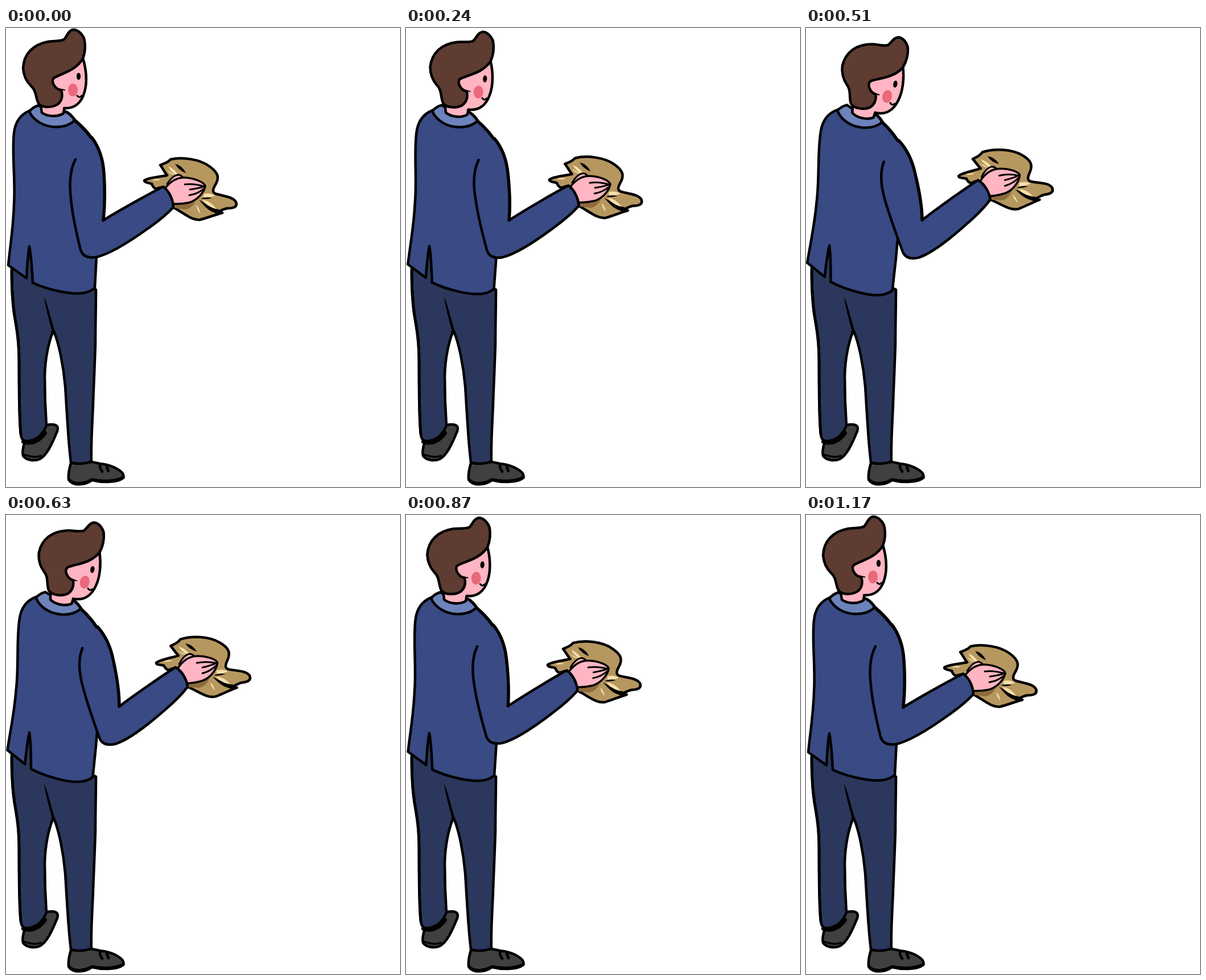
An HTML page that plays this animation: 692 by 807 pixels, repeating every 1290 ms.

```html
<!DOCTYPE html>
<html lang="en">
<head>
<meta charset="utf-8">
<title>Polishing loop</title>
<style>
  html, body { margin: 0; width: 100%; height: 100%; overflow: hidden; background: #fff; }
  svg { display: block; width: 692px; height: 807px; }
  .line { fill: none; }
  .ink { fill: #000; stroke: none; }
  .flat { stroke: none; }
  .jacket { fill: #394a84; }
  .trousers { fill: #2b375c; }
  .collar { fill: #6c83bb; }
  .shoe { fill: #404040; }
  .skin { fill: #ffb5c2; }
  .hair { fill: #5e3c31; }
  .cloth { fill: #b6975f; }
  .shade { fill: #8c6a3b; }
  .shine { fill: #f6dfaa; }
</style>
</head>
<body>
<svg viewBox="0 0 692 807" stroke="#000" stroke-width="4.500" stroke-linecap="round" stroke-linejoin="round">
  <g id="legs">
    <path class="shoe" d="M33 727C30 737 28 746 30 752C35 760 50 762 59 758C74 750 83 725 90 709C93 699 88 695 71 698Z"/>
    <path class="line" stroke-width="3.500" d="M31 750C42 753 52 756 61 752"/>
    <path class="shoe" d="M114 765C111 775 109 785 110 794C117 806 139 804 151 795C171 800 196 799 206 791C210 780 187 768 165 766Q157 764 150 763Z"/>
    <path class="line" stroke-width="5" d="M111 794C118 803 137 802 151 794C170 798 192 797 206 790"/>
    <path class="line" d="M165 769Q165 775 169 780M177 768Q177 774 180 779"/>
    <path class="trousers" d="M40 400L10 420C10 450 11 480 15 506C20 534 23 554 23 590C23 635 23 685 26 714C27 725 32 727 40 726C53 724 64 716 71 699C69 670 68 643 68 612C69 577 75 554 83 531C93 553 101 595 104 630C107 675 109 725 114 764Q132 769 150 762C149 725 152 690 153 660C154 630 156 590 157 555C157 520 158 490 158 460L148 455L60 395Z"/>
    <path class="line" stroke-width="5" d="M10 426C10 450 11 480 15 506C20 534 23 554 23 590C23 635 23 685 26 714"/>
    <path class="line" stroke-width="8" d="M31 727C45 732 59 725 68 712"/>
    <path class="ink" d="M67 473C74 488 78 508 84 527L83 542C78 520 70 497 67 473Z"/>
  </g>

  <g id="torso">
    <path class="jacket" d="M42 145C25 152 16 165 14 185C10 220 17 270 14 310C13 350 7 385 4 417L36 440C37 420 38 400 41 384C45 405 46 430 47 448C75 461 115 469 135 466C145 465 151 461 156 457L159 400L161 330L164 250L158 206C148 188 132 172 120 162Z"/>
    <path class="line" stroke-width="5.500" d="M118 160C133 172 149 189 158 206"/>
    <path class="collar" d="M57 136Q47 139 41 147C49 164 68 174 88 174C104 174 115 168 121 162C115 153 109 148 102 146L78 148Z"/>
    <path class="line" stroke-width="5" d="M107 148Q115 153 121 162"/>
  </g>

  <g id="hold">
    <path class="cloth" d="M243 268C249 263 269 262 283 259C278 253 275 246 271 241C278 238 284 237 289 231C310 226 341 231 357 243C374 255 375 264 367 277C362 286 363 290 370 292C384 296 399 297 404 306C407 315 399 317 389 317C382 318 376 322 369 324L380 325C362 330 353 334 341 337C326 339 312 325 295 316L281 282Q274 279 269 281C262 285 258 280 256 274C250 272 243 272 243 268Z"/>
    <path class="flat shade" d="M291 304C304 311 323 310 334 303Q327 317 315 319L294 316Z"/>
    <path class="flat shade" d="M344 276Q352 281 346 291L337 301Q346 283 344 276Z"/>
    <path class="flat shine" d="M285 243Q298 249 304 261Q291 256 285 243ZM283 250Q292 256 299 259Q288 258 283 250ZM256 267Q264 264 272 267Q263 269 256 267ZM347 292Q358 289 367 295Q357 299 347 298ZM345 302Q360 304 370 319Q354 315 345 302ZM334 311Q340 317 341 326Q335 320 334 311Z"/>
    <path class="ink" d="M297 239Q309 241 316 255Q304 251 297 239ZM339 302C350 307 357 317 374 319L371 326C355 323 347 311 339 302ZM342 300Q350 296 362 299Q353 302 342 300Z"/>
    <path class="skin" stroke-width="3" d="M283 274C288 266 295 259 302 258Q307 258 311 263L291 276Z"/>
    <path class="skin" stroke-width="3.500" d="M280 281C288 271 300 262 315 263C331 264 348 271 350 278C348 289 336 303 321 307Q306 310 293 309Z"/>
    <path class="line" stroke-width="3" d="M314 275Q331 273 349 279M323 284Q337 282 347 279M322 294Q336 292 347 283"/>
  </g>

  <g id="sleeve">
    <path class="jacket flat" d="M122 231C112 250 111 275 114 300C117 335 125 365 131 390C134 400 143 405 158 403C185 397 225 370 250 352C270 338 285 325 294 315C293 300 286 286 276 279C258 288 205 317 171 338C174 310 174 285 172 255C170 225 160 205 151 193Z"/>
    <path class="line" d="M122 231C112 250 111 275 114 300C117 335 125 365 131 390C134 400 143 405 158 403C185 397 225 370 250 352C270 338 285 325 294 315C293 300 286 286 276 279C258 288 205 317 171 338"/>
    <path class="line" stroke-width="5.500" d="M151 193C160 205 170 225 172 255C174 285 174 310 171 338"/>
  </g>

  <g id="head">
    <path class="skin flat" d="M75 60L135 53C141 72 143 95 138 112C133 131 121 141 102 142L101 150C90 157 73 156 63 149L58 128Z"/>
    <path class="line" d="M135 53C141 72 143 95 138 112C133 131 121 142 102 141"/>
    <path class="line" d="M102 143L101 150C90 157 73 156 63 149L61 136"/>
    <path class="hair" d="M117 3C109 5 107 15 102 20C95 24 84 22 74 24C48 29 31 45 30 71C31 84 36 94 44 102C54 110 52 126 58 134C66 141 82 140 91 134C98 128 100 119 97 109C86 108 78 94 84 88C99 79 121 76 135 54C139 43 140 30 137 18C133 9 125 2 117 3Z"/>
    <path class="line" stroke-width="2" d="M97 108L103 109"/>
    <ellipse class="ink" cx="127.500" cy="85" rx="3.600" ry="6.200"/>
    <ellipse cx="117.500" cy="109" rx="8.500" ry="11.200" fill="#e8697b" stroke="none"/>
    <path class="line" stroke-width="3" d="M125 119Q129 124 133 119"/>
  </g>
</svg>
<script>
const LOOP = 1290, STEP = 30;
const times = [0, 240, 360, 525, 750, 1035];
const lean = [0, 0.37, 0.7, 1, 0.48, 0];
const reach = {
  x: [0, 9, 16.5, 26.5, 13.7, 0],
  y: [0, -3, -7, -17, -13.5, 0],
  turn: [0, -1.1, -2.7, -6.3, -3.9, 0]
};
const hip = [75, 385], neck = [71, 245], grip = [325, 285];
const part = id => document.getElementById(id);
const torso = part('torso'), head = part('head'), hold = part('hold');
const sleeve = [...part('sleeve').children].map(path => ({ path, shape: path.getAttribute('d') }));

// Smooth curve through the keys that rests at each turning point.
function curve(keys, t) {
  const last = times.length - 1;
  if (t >= times[last]) return keys[last];
  const secant = i => (keys[i + 1] - keys[i]) / (times[i + 1] - times[i]);
  const slope = i => {
    if (i === 0 || i === last) return 0;
    const a = secant(i - 1), b = secant(i);
    return a * b > 0 ? 2 * a * b / (a + b) : 0;
  };
  let i = 0;
  while (t >= times[i + 1]) i++;
  const span = times[i + 1] - times[i];
  const u = (t - times[i]) / span, v = 1 - u;
  return v * v * (1 + 2 * u) * keys[i] + u * u * (3 - 2 * u) * keys[i + 1]
    + span * u * v * (v * slope(i) - u * slope(i + 1));
}

function spin(x, y, [cx, cy], degrees) {
  const a = degrees * Math.PI / 180, c = Math.cos(a), s = Math.sin(a);
  return [cx + (x - cx) * c - (y - cy) * s, cy + (x - cx) * s + (y - cy) * c];
}

// The sleeve follows the torso at the shoulder and the hand from the elbow on.
function bend(shape, tilt, x, y, turn) {
  return shape.replace(/(\d+) (\d+)/g, (_, px, py) => {
    const along = (py - 192 + 0.4 * (px - 150)) / 130;
    const w = Math.sqrt(Math.min(1, Math.max(0, along)));
    const a = spin(+px, +py, hip, tilt), b = spin(+px, +py, grip, turn);
    const mx = a[0] + (b[0] + x - a[0]) * w, my = a[1] + (b[1] + y - a[1]) * w;
    return `${mx.toFixed(2)} ${my.toFixed(2)}`;
  });
}

function draw(t) {
  const p = curve(lean, t), tilt = 3.4 * p;
  const x = curve(reach.x, t), y = curve(reach.y, t), turn = curve(reach.turn, t);
  torso.setAttribute('transform', `rotate(${tilt} ${hip})`);
  head.setAttribute('transform', `rotate(${11 * p} ${neck})`);
  hold.setAttribute('transform', `translate(${x} ${y}) rotate(${turn} ${grip})`);
  for (const { path, shape } of sleeve) path.setAttribute('d', bend(shape, tilt, x, y, turn));
}

const start = performance.now();
function tick(now) {
  const t = Math.max(0, now - start) % LOOP;
  draw(Math.floor(t / STEP) * STEP);
  requestAnimationFrame(tick);
}
draw(0);
requestAnimationFrame(tick);
</script>
</body>
</html>
```
